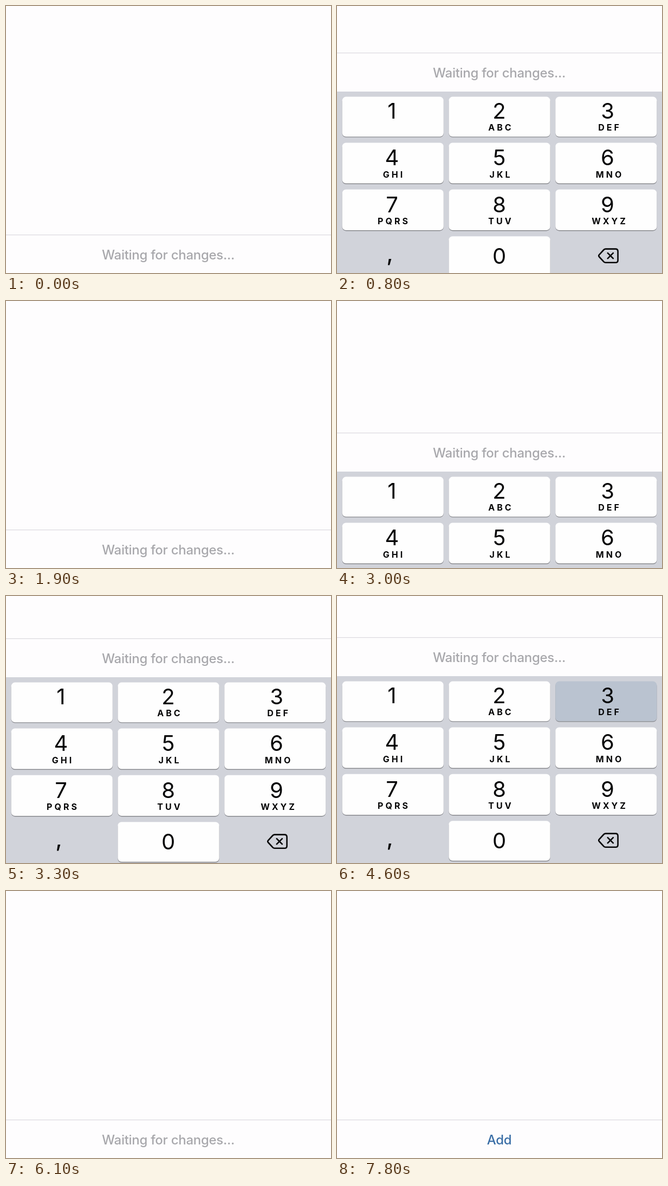
An HTML page that plays this animation: 600 by 493 pixels, repeating every 8 s.

```html
<!DOCTYPE html>
<html lang="en">
<head>
<meta charset="utf-8">
<title>Keypad</title>
<style>
  html, body { margin: 0; width: 100%; height: 100%; overflow: hidden; background: #fefdfe; }
  svg { display: block; width: 100%; height: 100%; }
  text {
    font-family: Inter, "Liberation Sans", sans-serif;
    font-optical-sizing: none;
    text-anchor: middle;
    fill: #050506;
  }
  .title { font-size: 24px; font-weight: 500; letter-spacing: -.28px; }
  #wait { fill: #a8a8ac; }
  #add { fill: #3a6ea6; }
  .digit { font-size: 40px; }
  .comma { font-size: 40px; font-weight: 500; }
  .letters { font-size: 16px; font-weight: 700; letter-spacing: 4px; }
  .icon { fill: none; stroke: #050506; stroke-width: 2.6; stroke-linejoin: round; stroke-linecap: round; }
</style>
</head>
<body>
<svg viewBox="0 0 600 493" preserveAspectRatio="none">
  <g id="panel">
    <rect y="76" width="600" height="1.3" fill="#dcdbe0"/>
    <text id="wait" class="title" x="299.5" y="121.6">Waiting for changes...</text>
    <text id="add" class="title" x="299.5" y="121.6">Add</text>
    <rect y="148" width="600" height="360" fill="#d1d3da"/>
    <g id="keys"></g>
    <text class="comma" x="97.5" y="461">,</text>
    <g class="icon">
      <path d="M496 438.6H514.2Q518.6 438.6 518.6 443V459.4Q518.6 463.8 514.2 463.8H496Q494 463.8 492.6 462.4L484 453Q482.4 451.2 484 449.4L492.6 440Q494 438.6 496 438.6Z"/>
      <path d="M499.8 446.2L509.8 456.2M509.8 446.2L499.8 456.2"/>
    </g>
  </g>
</svg>
<script>
const LOOP = 8000, STEP = 100, TRAVEL = 346, OMEGA = 18.26;
const $ = id => document.getElementById(id);

const labels = ['', 'ABC', 'DEF', 'GHI', 'JKL', 'MNO', 'PQRS', 'TUV', 'WXYZ'];
const cols = [
  { x: 9.6, digit: 101.5, letters: 105 },
  { x: 206.4, digit: 299.5, letters: 302.5 },
  { x: 403.2, digit: 499.5, letters: 503.5 }
];
const rows = [
  { y: 157.6, h: 73.6, mid: 183 },
  { y: 242.4, h: 75.2, mid: 269.5 },
  { y: 328.8, h: 75.2, mid: 356 },
  { y: 415.2, h: 73.6, mid: 451.4 }
];

function put(tag, attrs, content = '') {
  const el = document.createElementNS('http://www.w3.org/2000/svg', tag);
  for (const name in attrs) el.setAttribute(name, attrs[name]);
  el.textContent = content;
  return $('keys').appendChild(el);
}

function addKey(digit, col, row, letters) {
  const box = { x: col.x, y: row.y, width: 187.2, height: row.h, rx: 7 };
  put('rect', { ...box, y: row.y + 1.4, fill: '#88898e' });
  const face = put('rect', { ...box, fill: '#fefefe' });
  put('text', { class: 'digit', x: col.digit, y: row.mid + 14.5 }, digit);
  if (letters) put('text', { class: 'letters', x: col.letters, y: row.mid + 37.3 }, letters);
  return face;
}

const faces = labels.map((s, i) => addKey(i + 1, cols[i % 3], rows[Math.floor(i / 3)], s));
addKey(0, cols[1], rows[3]);

// [start, panel is open afterwards]
const slides = [[505, 1], [1343, 0], [2905, 1], [5543, 0]];
// [start, end, key index]
const presses = [[3900, 4000, 0], [4300, 4400, 1], [4600, 4700, 2]];
const fade = { start: 7250, length: 450 };

// Critically damped spring from 0 to 1
function spring(ms) {
  const x = OMEGA * ms / 1000;
  return 1 - (1 + x) * Math.exp(-x);
}

function openness(t) {
  const now = slides.filter(s => s[0] <= t).pop();
  if (!now) return 0;
  const p = spring(t - now[0]);
  return now[1] ? p : 1 - p;
}

function draw(t) {
  const y = Math.round(TRAVEL * (1 - openness(t)));
  $('panel').setAttribute('transform', `translate(0 ${y})`);
  faces.forEach((face, i) => {
    const down = presses.some(([a, b, key]) => key === i && t >= a && t < b);
    face.setAttribute('fill', down ? '#bac3d0' : '#fefefe');
  });
  const p = Math.min(1, Math.max(0, (t - fade.start) / fade.length));
  $('wait').setAttribute('opacity', 1 - p);
  $('add').setAttribute('opacity', p);
}

const begin = performance.now();
function tick() {
  const t = (performance.now() - begin) % LOOP;
  draw(Math.floor(t / STEP) * STEP);
  requestAnimationFrame(tick);
}
draw(0);
requestAnimationFrame(tick);
</script>
</body>
</html>
```
